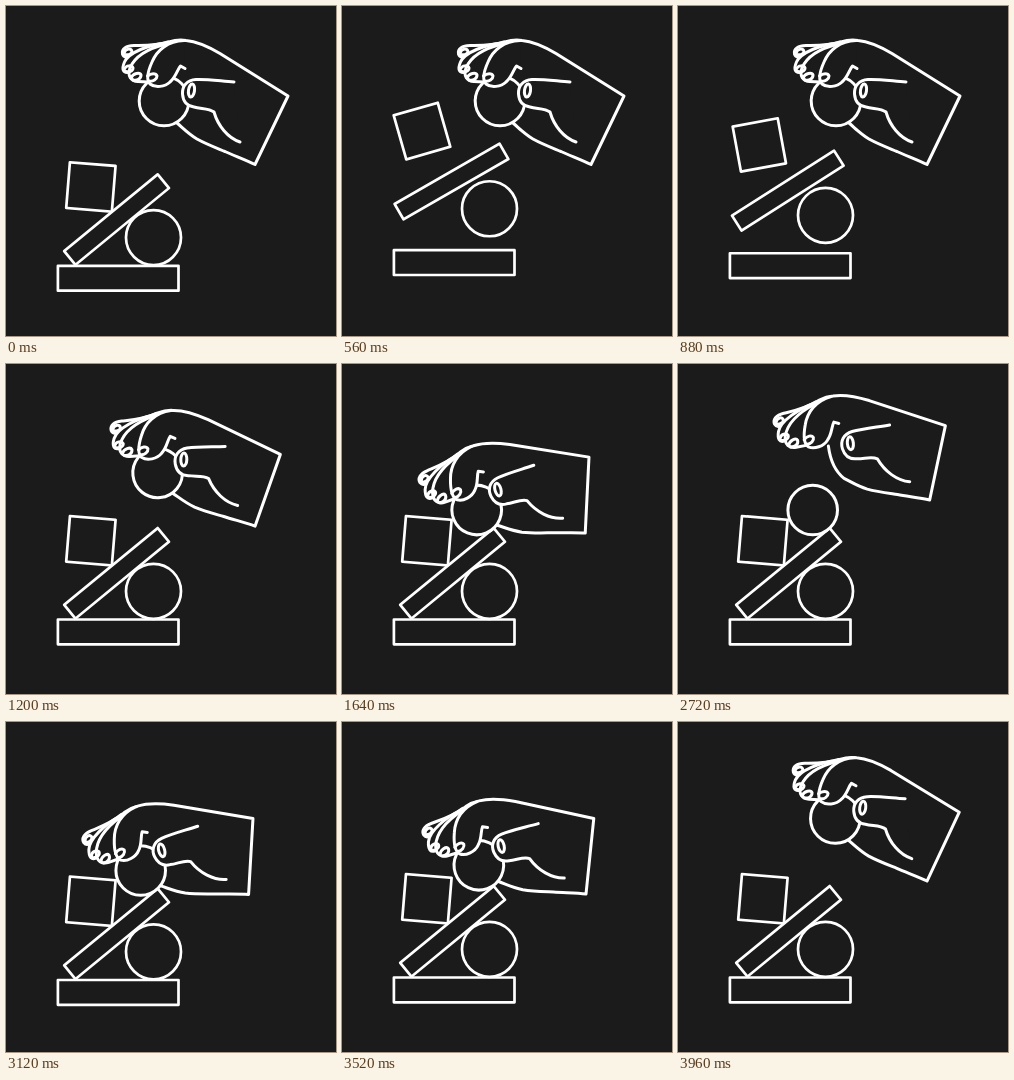
These frames come from a looping animation (330x330 px, 4 s). An HTML page:

```html
<!DOCTYPE html>
<html lang="en">
<head>
<meta charset="utf-8">
<title>Balancing shapes</title>
<style>
  html, body { margin: 0; height: 100%; overflow: hidden; background: #1b1b1b; }
  svg { display: block; width: 100%; height: 100%; }
  svg * { fill: #1b1b1b; stroke: #fff; stroke-width: 2.7; stroke-linecap: round; stroke-linejoin: round; }
  #palm *, #fingers *, #ball { stroke-width: 3; }
  #fingers .line { fill: none; }
</style>
</head>
<body>
<svg viewBox="0 0 330 330">
  <rect id="base" x="-60.3" y="-12.4" width="120.6" height="24.8"/>
  <circle id="disc" r="27.5"/>
  <rect id="square" x="-22.9" y="-22.9" width="45.8" height="45.8"/>
  <rect id="plank" x="-60.5" y="-8.9" width="121" height="17.8"/>
  <g id="palm">
    <path d="M150 42C160 36 171 33 180 34.500C192 35.500 203 41 214 47.500L282 90L249 158.500C240 154 229 150 219 145.500C208 141 200 138 191 133C182 127.500 177 122 171 117C164 108 162 95 163.500 82"/>
  </g>
  <circle id="ball" r="24.800"/>
  <g id="fingers">
    <path d="M162 36C150 40 140 39.500 128 39.500C120 39.500 115.500 43 116.500 48C118 53 125 51 130 47"/>
    <path d="M160 37C143 39 123 46 118.500 56C115.500 63 117 67 122 66.500C128 66 130 60 134 55"/>
    <path d="M160 38C144 42 129 50 124 62C121 70 125 75 132 75.500L142 76"/>
    <path class="line" d="M118 47C120 42 126 42 126 46C125 49 121 49.500 118 48M118.500 63C120 59 126 59 127 62C127 65 123 67 119 65M125 72C127 67 134 66 135 69C135 73 131 75 127 74"/>
    <path d="M178 34.500C162 35 151 44 146 56C142 65 140 74 144 78C149 82 159 81 164 76C170 71 171 64 174.500 60L179 62.500"/>
    <path class="line" d="M141.500 70C145 67 150 67 151 70C151 73 147 76 143 75"/>
    <path d="M228 76C214 75 201 73 190 73.500C181 74 176 80 176.500 88C177 95 181 100 188 101C195 103 203 102 208 106C212 120 222 132 234 136"/>
    <ellipse class="line" cx="185.500" cy="84.500" rx="3" ry="6.500" transform="rotate(8 185.500 84.500)"/>
  </g>
</svg>
<script>
const LOOP = 4000, HOP = 580, RELEASE = 1820, GRIP = 3240;
const BALL = [134.700, 146];
const $ = id => document.getElementById(id);
const mix = (a, b, p) => a + (b - a) * p;
const ease = p => p < .5 ? 4 * p ** 3 : 1 - 4 * (1 - p) ** 3;

// [x, y, angle] of the grip point
const AWAY = [158, 95, 0], TOUCH = [134.700, 146, -22.9], PRESS = [134.700, 151, -22.9],
      OPEN = [148.300, 95.500, -13.7], GRAB = [133.800, 150.200, -22.7];
// start, end, from, to
const moves = [
  [972, 1532, AWAY, TOUCH],
  [1650, RELEASE, TOUCH, PRESS],
  [RELEASE, 2260, PRESS, OPEN],
  [2640, GRIP, OPEN, GRAB],
  [GRIP, 4130, GRAB, AWAY]
];
// id, resting and airborne [x, y, angle]
const pieces = [
  ['base', [112.2, 267.900, 0], [112.2, 256.600, 0]],
  ['disc', [147.500, 227.300, 0], [147.500, 202.700, 0]],
  ['square', [84.900, 176.700, 4.7], [80, 125, -16]],
  ['plank', [110.600, 209.300, -39.4], [109.500, 175.500, -29.9]]
];

function place(id, [x, y, a], tail = '') {
  $(id).setAttribute('transform', `translate(${x} ${y}) rotate(${a})${tail}`);
}

function handPose(t) {
  const [start, end, from, to] = moves.findLast(m => t >= m[0]) || moves[0];
  const p = ease(Math.min(1, Math.max(0, (t - start) / (end - start))));
  return from.map((v, i) => mix(v, to[i], p));
}

function draw(t) {
  const pose = handPose(t);
  const air = Math.max(0, 1 - ((t - HOP) / HOP) ** 2);
  // the stack sinks before the hop and under the hand's push
  const sink = t < HOP ? 4.4 * (1 - air) : Math.max(0, pose[1] - BALL[1]);
  for (const [id, rest, up] of pieces) {
    const [x, y, a] = rest.map((v, i) => mix(v, up[i], air));
    place(id, [x, y + sink, a]);
  }
  for (const id of ['palm', 'fingers']) place(id, pose, ' translate(-158 -95)');
  const resting = t > RELEASE && t < GRIP;
  place('ball', resting ? [BALL[0], BALL[1] + sink, 0] : pose);
}

const begin = performance.now();
function tick() {
  draw((performance.now() - begin) % LOOP);
  requestAnimationFrame(tick);
}
tick();
</script>
</body>
</html>
```
